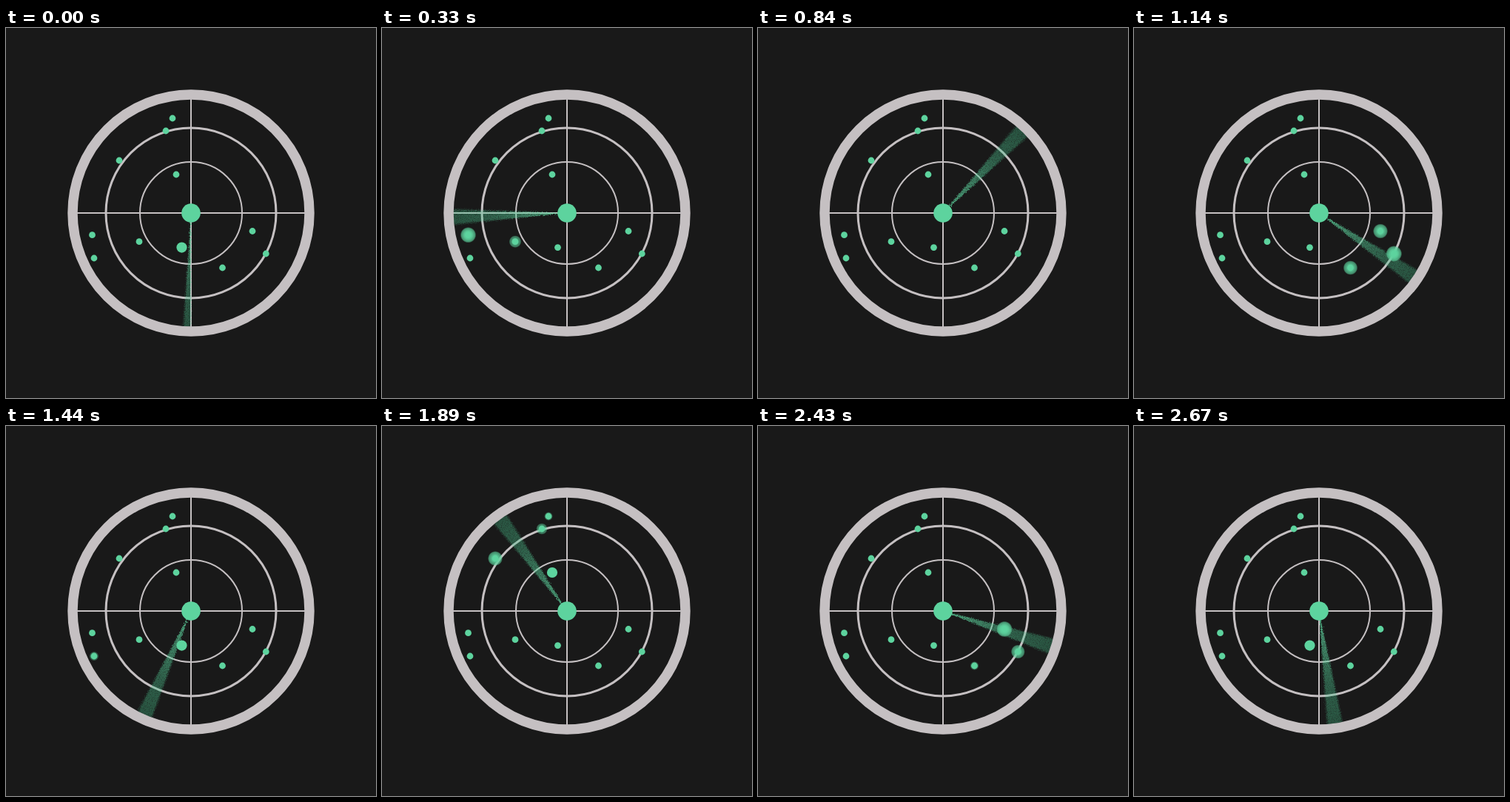
An HTML page that plays this animation: 500 px wide and 500 px high, repeating every 2700 ms.

```html
<!DOCTYPE html>
<html lang="en">
<head>
<meta charset="utf-8">
<title>Radar</title>
<style>
html, body { margin: 0; width: 100%; height: 100%; overflow: hidden; background: #191919; }
svg { display: block; width: 100%; height: 100%; }
</style>
</head>
<body>
<svg viewBox="0 0 500 500">
  <defs>
    <radialGradient id="beamFill" gradientUnits="userSpaceOnUse" cx="0" cy="0" r="154">
      <stop offset="0" stop-color="#5dd39e" stop-opacity=".9"/>
      <stop offset=".3" stop-color="#5dd39e" stop-opacity=".6"/>
      <stop offset=".65" stop-color="#50c792" stop-opacity=".4"/>
      <stop offset="1" stop-color="#46bd88" stop-opacity=".34"/>
    </radialGradient>
    <radialGradient id="glow">
      <stop offset=".5" stop-color="#5dd39e"/>
      <stop offset=".85" stop-color="#5dd39e" stop-opacity=".7"/>
      <stop offset="1" stop-color="#5dd39e" stop-opacity="0"/>
    </radialGradient>
    <filter id="grain" filterUnits="userSpaceOnUse" x="80" y="80" width="340" height="340" color-interpolation-filters="sRGB">
      <feTurbulence type="fractalNoise" baseFrequency=".8" numOctaves="2" seed="4" result="noise"/>
      <feDisplacementMap in="SourceGraphic" in2="noise" scale="5" xChannelSelector="R" yChannelSelector="G" result="rough"/>
      <feColorMatrix in="noise" values="0 0 0 0 1  0 0 0 0 1  0 0 0 0 1  0 0 0 1.6 .15"/>
      <feComposite in="rough" operator="in"/>
    </filter>
    <clipPath id="face"><circle cx="250" cy="250" r="153.5"/></clipPath>
  </defs>
  <rect width="500" height="500" fill="#191919"/>
  <g fill="none" stroke="#c5c0c2">
    <path d="M250 95V405M95 250H405" stroke-width="2"/>
    <circle cx="250" cy="250" r="69" stroke-width="2"/>
    <circle cx="250" cy="250" r="115" stroke-width="3"/>
  </g>
  <g clip-path="url(#face)">
    <g filter="url(#grain)">
      <g id="beam" fill="url(#beamFill)">
        <path fill-opacity=".45"/>
        <path fill-opacity=".75"/>
      </g>
    </g>
  </g>
  <circle cx="250" cy="250" r="160" fill="none" stroke="#c5c0c2" stroke-width="13.4"/>
  <g id="dots" fill="#5dd39e"></g>
  <circle cx="250" cy="250" r="12.8" fill="#5dd39e"/>
</svg>
<script>
const TURN = 1350, STEP = 30, REST = 4.4;
const beam = document.getElementById('beam');
const layer = document.getElementById('dots');
const rad = deg => deg * Math.PI / 180;

// x, y, kind, delay of the pulse after the beam has passed
const dots = [
  [225, 122, 'glow', 20], [216, 139, 'glow', 20], [153, 179, 'glow', 20],
  [230, 198, 'grow', 0], [180, 288.7, 'glow', 20], [237.5, 296.6, 'grow', 0],
  [116.5, 279.7, 'glow', 20], [119, 311, 'glow', -45], [333, 274.5, 'glow', 20],
  [351.3, 305, 'glow', 20], [292.5, 324, 'glow', -45]
].map(([x, y, kind, delay]) => {
  const past = (Math.atan2(x - 250, 250 - y) / (2 * Math.PI) + 1.5) % 1;
  return { kind, peak: past * TURN + delay, halo: circle(x, y, 'url(#glow)'), core: circle(x, y) };
});

function circle(x, y, fill) {
  const c = document.createElementNS('http://www.w3.org/2000/svg', 'circle');
  c.setAttribute('cx', x);
  c.setAttribute('cy', y);
  c.setAttribute('r', REST);
  if (fill) c.setAttribute('fill', fill);
  return layer.appendChild(c);
}

// Angles run clockwise from straight down
function wedge(from, to) {
  const p = a => `${-165 * Math.sin(rad(a))} ${165 * Math.cos(rad(a))}`;
  return `M0 0L${p(from)}L${p(to)}Z`;
}

function draw(ms) {
  const t = Math.floor(ms / STEP) * STEP % TURN;
  beam.setAttribute('transform', `translate(250 250) rotate(${t / TURN * 360})`);
  [4.3, 3.5].forEach((half, i) =>
    // the sweep starts at the vertical line, so its first step is half open
    beam.children[i].setAttribute('d', wedge(t === 0 ? 0 : -half, half)));

  for (const d of dots) {
    const gap = (t - d.peak + 2.5 * TURN) % TURN - TURN / 2;
    let r = REST, s = 0;
    if (d.kind === 'grow') {
      r += 2.7 * Math.min(1, Math.max(0, (150 - Math.abs(gap)) / 50));
    } else {
      s = Math.max(0, 1 - (gap / 130) ** 2);
    }
    d.core.setAttribute('r', r);
    d.halo.setAttribute('r', REST + 6.5 * s);
    d.halo.setAttribute('opacity', s ? .3 + .65 * s : 0);
  }
}

const start = performance.now();
function tick() {
  draw(performance.now() - start);
  requestAnimationFrame(tick);
}
tick();
</script>
</body>
</html>
```
